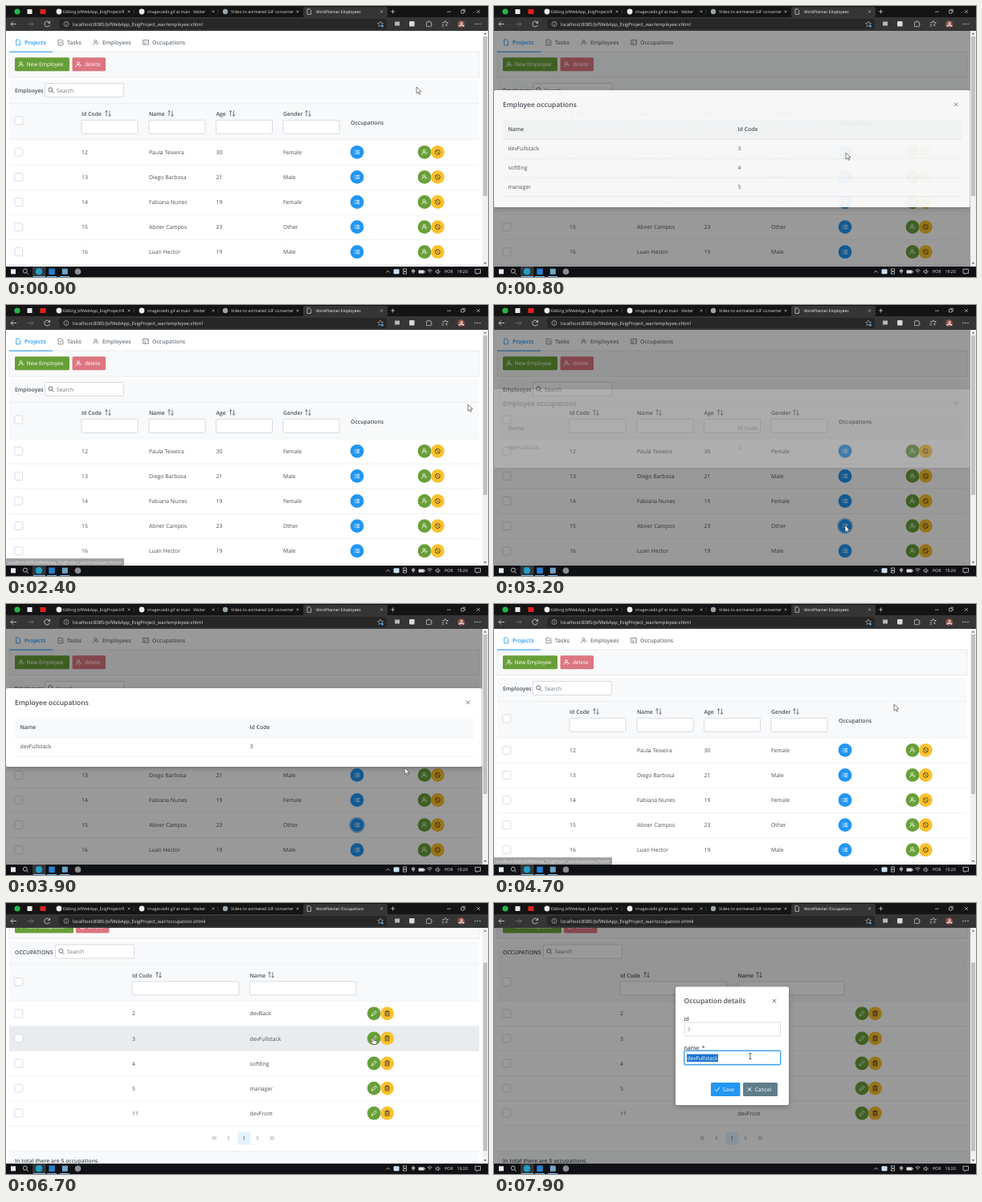
Recreate the animation shown at these times as an HTML page. Size 600 by 338 pixels, loop 8 s.

```html
<!DOCTYPE html>
<html lang="en">
<head>
<meta charset="utf-8">
<title>Employee occupations</title>
<style>
html, body { margin: 0; width: 100%; height: 100%; overflow: hidden; background: #fff; }
svg { display: block; width: 100vw; height: 100vh; }
text { font-family: "Open Sans", "Noto Sans", sans-serif; text-rendering: geometricPrecision; white-space: pre; }
</style>
</head>
<body>
<svg id="stage" viewBox="0 0 600 338"></svg>
<script>
const INK = '#495057', MUTED = '#6c757d', LINE = '#e9ecef', EDGE = '#ced4da', PANEL = '#f8f9fa';
const BLUE = '#2196f3', GREEN = '#689f38', AMBER = '#fbc02d';
const HOST = 'localhost:8085/JsfWebApp_EsigProject_war/';

const rect = (x, y, w, h, fill, more = '') =>
  `<rect x="${x}" y="${y}" width="${w}" height="${h}" fill="${fill}" ${more}/>`;
const disc = (x, y, r, fill, more = '') => `<circle cx="${x}" cy="${y}" r="${r}" fill="${fill}" ${more}/>`;
const ring = (x, y, r, color, w = .8) => disc(x, y, r, 'none', `stroke="${color}" stroke-width="${w}"`);
const line = (d, color, w = .8, more = '') =>
  `<path d="${d}" fill="none" stroke="${color}" stroke-width="${w}" ${more}/>`;
const text = (x, y, s, fill = INK, size = 6.85, more = '') =>
  `<text x="${x}" y="${y}" font-size="${size}" fill="${fill}" ${more}>${s}</text>`;
const bold = (x, y, s, fill = INK, size = 6.85) => text(x, y, s, fill, size, 'font-weight="600"');
const group = (id, body) => `<g id="${id}">${body}</g>`;

const field = (x, y, w, h = 17) => rect(x, y, w, h, '#fff', `rx="1.5" stroke="${EDGE}" stroke-width=".8"`);
const check = y => field(10.8, y - 5, 10, 10);
const cross = (x, y, r, color, w = .9) =>
  line(`M${x - r} ${y - r}l${2 * r} ${2 * r}m0-${2 * r}l-${2 * r} ${2 * r}`, color, w);
const lens = (x, y, color) => ring(x - .7, y - .7, 2.5, color) + line(`M${x + 1.2} ${y + 1.2}l2.2 2.2`, color);
const sort = x => line(`M${x} 137.5v-7l-1.6 2m1.6-2l1.6 2M${x + 4} 130.5v7l-1.6-2m1.6 2l1.6-2`, INK, .7);
const user = (x, y, color) => ring(x - .5, y - 1.6, 1.5, color) +
  line(`M${x - 3.4} ${y + 3}q.3-2.8 2.9-2.8t2.6 1M${x + .8} ${y + 3}l2.8-2.8`, color);
const pencil = (x, y) => line(`M${x - 3} ${y + 3}l.6-2.2 4-4 1.6 1.6-4 4z`, '#fff');
const trash = (x, y, color) =>
  line(`M${x - 3} ${y - 2}h6m-4.2 0v-1.3h2.4v1.3M${x - 2.3} ${y - 2}v5h4.6v-5M${x - .8} ${y - .4}v2m1.6-2v2`, color, .7);
const bars = (x, y) => line([-2, 0, 2].map(d => `M${x - 3.2} ${y + d}h1m1 0h4.4`).join(''), '#fff', .9);
const ban = (x, y) => ring(x, y, 3, '#212529', .7) + line(`M${x - 2} ${y - 2}l4 4`, '#212529', .7);

function button(x, y, w, fill, label, icon, dx = 14.5) {
  return rect(x, y, w, 17, fill, 'rx="1.5"') + icon(x + 8, y + 8.5) + text(x + dx, y + 11, label, '#fff', 6.7);
}

function menu() {
  const items = [[23, 'Projects'], [76, 'Tasks'], [120, 'Employees'], [182, 'Occupations']];
  return items.map(([x, s], i) => {
    const color = i ? MUTED : BLUE, c = x - 8;
    const icon = [
      () => line(`M${c - 2.3} 42h3l1.8 1.8v5h-4.8z`, color),
      () => line(`M${c + 3} 44.5v4.3h-6v-6.6h4.5M${c - 1.5} 45l1.5 1.5 3.5-4`, color),
      () => user(c, 45.5, color),
      () => rect(c - 3.3, 42.5, 6.6, 5.6, 'none', `stroke="${color}" stroke-width=".8"`) + line(`M${c - 2} 45h2m0 2h-2m3-2h1.5`, color)
    ][i]();
    return icon + bold(x, 48, s, color);
  }).join('') + rect(4, 57, 585, 32, PANEL, 'stroke="#dee2e6" stroke-width=".7"') + rect(4, 56.6, 54, 1, BLUE);
}

// Shared table page: caption, filters and five rows
function table(caption, searchX, cols, rows, actions, id) {
  let s = menu() + rect(4, 92.5, 585, 74.3, PANEL) + rect(4, 121, 585, .6, LINE) + bold(11, 108, caption);
  s += field(searchX, 96.5, 98) + lens(searchX + 7.5, 105, INK) + text(searchX + 14.5, 107.6, 'Search', MUTED, 6.7);
  s += check(143);
  for (const [x, label, w, sx] of cols)
    s += w ? bold(x, 137, label) + sort(sx) + field(x, 142.3, w) : bold(x, 147.6, label);
  s += rect(4, 166.8, 585, 31, LINE, `id="${id}Hover"`);
  rows.forEach((cells, i) => {
    const y = 182.3 + 31.1 * i;
    s += rect(4, y - 15.7, 585, .7, LINE) + check(y) + actions(y);
    cells.split('|').forEach((c, k) => s += text(cols[k][0], y + 2.6, c));
  });
  return s + rect(4, 322, 585, .7, LINE);
}

const employees = table('Emplooyes', 48.5,
  [[94, 'Id Code', 70, 125], [178, 'Name', 70, 203], [261.5, 'Age', 70, 279.5], [345, 'Gender', 70, 374], [429, 'Occupations']],
  ['12|Paula Teixeira|30|Female', '13|Diego Barbosa|21|Male', '14|Fabiana Nunes|19|Female', '15|Abner Campos|23|Other', '16|Luan Hector|19|Male'],
  y => disc(437, y, 8.4, BLUE) + bars(437, y) + disc(521, y, 8.4, GREEN) + user(521, y, '#fff') + disc(537.3, y, 8.4, AMBER) + ban(537.3, y), 'emp')
  + button(11, 64.3, 68, GREEN, 'New Employee', (x, y) => user(x, y, '#fff'))
  + button(82.5, 64.3, 41.5, '#dc7680', 'delete', (x, y) => user(x, y, '#fff'), 15.5);

const pager = (x, d, n) => line(Array.from({ length: n }, (_, i) =>
  `M${x + i * 2.6 - n + d} 335.5l${-2 * d} 2.3 ${2 * d} 2.3`).join(''), MUTED, .7);

const occupations = table('OCCUPATIONS', 61.5,
  [[157, 'Id Code', 133, 188], [303.5, 'Name', 132.5, 328]],
  ['2|devBack', '3|devFullstack', '4|softEng', '5|manager', '11|devFront'],
  y => disc(458, y, 8.4, GREEN) + pencil(458, y) + disc(474.5, y, 8.4, AMBER) + trash(474.5, y, '#212529'), 'occ')
  + button(11, 65, 73, GREEN, 'New occupation', (x, y) => line(`M${x - 3} ${y}h6m-3-3v6`, '#fff'), 14)
  + button(87, 65, 41.5, '#dc7680', 'delete', (x, y) => trash(x, y, '#fff'))
  + rect(288.5, 330, 16, 16, '#e3f2fd', 'rx="1.5"') + text(294.6, 340.6, '1')
  + pager(260, 1, 2) + pager(278, 1, 1) + pager(314, -1, 1) + pager(332, -1, 2)
  + rect(4, 354, 585, 16, PANEL) + rect(4, 354, 585, .7, LINE) + bold(11, 368.4, 'In total there are 5 occupations.');

function listDialog(rows) {
  let s = rect(0, 105, 592.5, 50.5 + 24 * rows.length + 23.5, '#fff', 'rx="2" filter="url(#shadow)"')
    + bold(11, 125.6, 'Employee occupations', INK, 8.5) + cross(575, 122.7, 2.3, MUTED)
    + rect(11, 142, 571, 24, PANEL) + bold(17.5, 156.4, 'Name') + bold(303.5, 156.4, 'Id Code');
  rows.forEach(([name, code], i) => {
    const y = 180.2 + 23.8 * i;
    s += rect(11, y - 14.2, 571, .7, LINE) + text(17.5, y, name) + text(303.5, y, code);
  });
  return s + rect(11, 166 + 23.8 * rows.length, 571, .7, LINE);
}

const editDialog = rect(226, 104.5, 141, 147.5, '#fff', 'rx="2" filter="url(#shadow)"')
  + bold(236.5, 124.8, 'Occupation details', INK, 8.5) + cross(349, 122, 2.3, MUTED)
  + bold(236.5, 147, 'id') + field(237, 149, 119.5) + text(240.5, 160, '3', '#868e96')
  + bold(236.5, 183, 'name  *')
  + group('focus', rect(236.6, 184, 120.2, 18, 'none', 'rx="2" stroke="#a6d5fa" stroke-width="2"'))
  + field(237, 184.4, 119.5) + rect(237, 184.4, 119.5, 17, 'none', `id="focusLine" rx="1.5" stroke="${BLUE}" stroke-width=".9"`)
  + rect(240, 188.5, 39, 9.6, '#1b74d1', 'id="pick"') + text(240.5, 195.8, 'devFullstack', INK, 6.7, 'id="value"')
  + button(270, 224, 36.5, BLUE, 'Save', (x, y) => line(`M${x - 3} ${y}l2 2.3 4-5`, '#fff', 1))
  + button(310, 224, 43, '#607d8b', 'Cancel', (x, y) => cross(x, y, 2.3, '#fff', 1));

const closeX = x => cross(x, 7, 1.5, '#ccc', .6);
const chrome = rect(0, 0, 600, 14.5, '#141414') + rect(370, 1, 105, 14, '#353535', 'rx="2"') + rect(0, 14, 600, 17, '#353535')
  + rect(66, 16, 408, 13, '#272727', 'rx="2"')
  + disc(14, 7, 3.6, '#25b648') + rect(26.5, 4, 6, 6, '#e8e8e8') + rect(42.5, 4, 7, 6, '#e32020')
  + disc(66, 7, 3.4, '#f0f0f0') + disc(169, 7, 3.4, '#f0f0f0') + disc(273, 7, 3.2, '#9aa5ad')
  + line('M375 3.8h3l1.6 1.6v5h-4.6z', '#ddd', .7)
  + text(71, 9, 'Editing JsfWebApp_EsigProject/R', '#ddd', 5.1) + text(176, 9, 'images/edit.gif at main · Walter', '#ddd', 5)
  + text(280, 9, 'Video to animated GIF converter', '#ddd', 5.2) + text(386, 9, '', '#fff', 4.9, 'id="tab"')
  + [153, 258, 363, 467.5].map(closeX).join('') + line('M159.5 4v6M264 4v6', '#555', .6)
  + line('M479 7h5m-2.5-2.5v5', '#ddd', .7) + line('M549 7.2h5M566.5 5.5h3.5v3.5h-3.5zM568 5.5v-1.3h3.4v3.4h-1.4', '#ddd', .6)
  + cross(588, 7, 2, '#ddd', .6)
  + line('M13 22.5h-7l3-3m-3 3l3 3', '#ddd') + line('M27 22.5h7l-3-3m3 3l-3 3', '#777')
  + line('M54.4 21.2a3.4 3.4 0 1 0 0 2.6M54.6 18.8v2.5h-2.5', '#ddd')
  + ring(75, 22.5, 3, '#ccc', .6) + line('M75 22v2.3m0-3.8v.7', '#ccc', .6)
  + text(83, 24.7, '', '#ddd', 5.85, 'id="url"')
  + line('M466 19l1 2.3 2.5.2-1.9 1.7.6 2.5-2.2-1.4-2.2 1.4.6-2.5-1.9-1.7 2.5-.2z', '#bbb', .6)
  + rect(484, 19.5, 6, 5, '#b4b7ba') + disc(468.5, 25, 1.5, '#3d9bea') + rect(502, 19, 6.5, 6.5, '#dadada', 'rx="1"')
  + line('M523.5 20h2v-1h1.6v1h2v2h1v1.6h-1v2h-5.6z', '#ccc', .7)
  + line('M543 20.5h3l1-2 1 2h2.4l-2 2 .6 2.5-2-1.3M542.5 23h3m-3 2.2h2.5', '#ccc', .7)
  + disc(566.5, 22.5, 4.5, '#8d4a45') + disc(567, 21.5, 2, '#c9a595') + line('M563.4 25.3q3.5-2.6 7 0', '#e1dcd8', 1.5)
  + [584, 587, 590].map(x => disc(x, 22.5, .7, '#ddd')).join('');

const taskbar = rect(0, 325, 600, 13, '#101114') + rect(33, 325, 16.5, 13, '#34373b')
  + rect(6, 328.3, 6, 6, '#e8eef2') + lens(24.5, 331.3, '#ddd')
  + disc(41, 331.2, 4.1, '#239ec4') + rect(53.3, 327.5, 7.5, 7.5, '#2580d0') + rect(69.8, 327.7, 7, 7, '#6fa6c8')
  + disc(89.5, 331.3, 3.8, '#8b8d90') + rect(34, 337, 15, 1, '#76b9ed') + rect(51, 337, 12, 1, '#76b9ed') + rect(67, 337, 12, 1, '#76b9ed')
  + line('M473 332.5l2.3-2.3 2.3 2.3', '#ddd') + rect(482.5, 328.3, 7, 6, '#c8e1f2', 'rx="1"')
  + rect(494.5, 328, 4, 6, 'none', 'stroke="#ddd" stroke-width=".7"') + disc(496.5, 331, 1, '#ddd')
  + line('M507 328v6m-1.6-4.5h3.2v2h-3.2z', '#ddd', .8) + rect(513.5, 329.5, 7, 4, '#ddd') + rect(521, 330.6, .8, 1.8, '#ddd')
  + line('M524.5 330q3-2.6 6 0m-4.7 1.6q1.7-1.4 3.4 0m-1.7 2v.6', '#ddd')
  + line('M535 330.2h1.4l1.8-1.6v5.4l-1.8-1.6h-1.4zm4.5-.2q1.2 1.3 0 2.8', '#ddd', .7)
  + text(546, 333.2, 'POR', '#eee', 5.2) + text(561.5, 333.2, '19:20', '#eee', 5.2)
  + line('M584 328.3h6.5v5h-3l-1.4 1.4v-1.4h-2.1z', '#eee', .7);

const stage = document.getElementById('stage');
stage.innerHTML = '<filter id="shadow" x="-10%" y="-10%" width="120%" height="130%"><feDropShadow dx="0" dy="2" stdDeviation="3" flood-opacity=".25"/></filter>'
  + rect(0, 0, 600, 338, '#fff')
  + group('emp', employees + disc(437, 275.6, 9, 'none', `id="ring" stroke="#7fc0f5" stroke-width="1.6"`)) + group('occ', occupations)
  + rect(0, 31, 593, 294, '#000', 'id="mask"')
  + group('listA', listDialog([['devFullstack', 3], ['softEng', 4], ['manager', 5]]))
  + group('listB', listDialog([['devFullstack', 3]])) + group('edit', editDialog)
  + rect(593, 31, 7, 294, '#f1f1f1') + rect(594, 38, 5, 199, '#c1c1c1', 'id="thumb"')
  + '<path d="M594.8 35.5l1.7-2 1.7 2zM594.8 320l1.7 2 1.7-2z" fill="#555"/>'
  + group('status', rect(0, 316, 147, 9, '#444', 'rx="1"') + text(2, 322.6, '', '#ddd', 5, 'id="link"'))
  + chrome + taskbar
  + `<g id="cursor" stroke="#333" stroke-width=".6" fill="#fff">
    <path id="arrow" d="M0 0v8.2l2-1.8 1.3 2.9 1.3-.6-1.3-2.8h2.6z"/>
    <path id="hand" d="M-.8 1q0-1 .8-1t.8 1v3.2l3.2.7q1 .3.9 1.4l-.6 3h-4.6l-2.6-3q-.3-1.2.9-.9l1.2.9z"/>
    <path id="beam" d="M-1.5-3.5h3m-1.5 0v7m-1.5 0h3" stroke-width=".8"/></g>`;

const el = Object.fromEntries([...stage.querySelectorAll('[id]')].map(e => [e.id, e]));
const clamp = v => Math.max(0, Math.min(1, v));
const swing = v => .5 - Math.cos(Math.PI * clamp(v)) / 2;
const show = (e, v) => { e.style.opacity = +v; };

// Pointer path: time, x, y
const path = [[0, 511, 101], [420, 438, 183], [1200, 438, 183], [1800, 539, 139], [2050, 574, 121], [2250, 574, 121],
  [2400, 575, 124], [2520, 572, 132], [2980, 437, 275], [3500, 437, 275], [4350, 567, 120], [4550, 567, 120], [4700, 498, 125],
  [5080, 204, 45], [5480, 204, 45], [6000, 469, 166], [6350, 469, 166], [6650, 457, 167], [7250, 457, 167], [7580, 319, 191], [8000, 319, 191]];

function pointer(t) {
  const i = path.findIndex((k, n) => n && t <= k[0]);
  const [a, b] = [path[i - 1], path[i]], p = swing((t - a[0]) / (b[0] - a[0]));
  return [a[1] + (b[1] - a[1]) * p, a[2] + (b[2] - a[2]) * p];
}

const dialogs = [['listA', 470, 2250], ['listB', 3080, 4550], ['edit', 6900, 9000]];
const links = [[2000, 2320, 'employee.xhtml#'], [4330, 4620, 'employee.xhtml#'], [5040, 5450, 'occupation.xhtml']];

function draw(t) {
  const second = t >= 5450, [x, y] = pointer(t);
  const scroll = 44.5 * (1 - (1 - clamp((t - 6000) / 281)) ** 2);
  show(el.emp, !second);
  show(el.occ, second);
  el.occ.setAttribute('transform', `translate(0 ${-scroll})`);
  el.thumb.setAttribute('y', second ? 37 + scroll * .84 : 38);
  el.thumb.setAttribute('height', second ? 235 : 199);
  el.tab.textContent = 'WorkPlanner ' + (second ? 'Occupations' : 'Employees');
  el.url.textContent = HOST + (second ? 'occupation.xhtml' : 'employee.xhtml');

  let veil = 0;
  for (const [id, from, to] of dialogs) {
    const out = 1 - clamp((t - to) / 100);
    show(el[id], Math.min(swing((t - from) / 400), out));
    veil = Math.max(veil, Math.min(clamp((t - from) / 120), out));
  }
  show(el.mask, veil * .4);
  show(el.ring, t > 3050 && t < 4600);

  const row = Math.floor((y + scroll - 166.8) / 31.1), over = !veil && row >= 0 && row < 5;
  for (const id of ['empHover', 'occHover']) {
    show(el[id], over);
    el[id].setAttribute('y', 166.8 + 31.1 * row);
  }

  show(el.status, 0);
  for (const [from, to, page] of links) {
    if (t < from || t > to + 160) continue;
    show(el.status, Math.min(clamp((t - from) / 80), 1 - clamp((t - to) / 160)));
    el.link.textContent = HOST + page;
  }

  const typed = t >= 7400, picked = t >= 7700;
  show(el.focus, typed);
  show(el.focusLine, typed);
  show(el.pick, picked);
  el.value.setAttribute('fill', picked ? '#fff' : INK);

  const onButton = over && (second ? x > 449 && x < 483 : (x > 428 && x < 446) || (x > 512 && x < 546));
  const onLink = links.some(([from, to]) => t >= from && t < to);
  const beam = t > 7480, hand = !beam && (onButton || onLink);
  show(el.beam, beam);
  show(el.hand, hand);
  show(el.arrow, !beam && !hand);
  el.cursor.setAttribute('transform', `translate(${x} ${y})`);
}

const start = performance.now();
function tick() {
  draw((performance.now() - start) % 8000);
  requestAnimationFrame(tick);
}
tick();
</script>
</body>
</html>
```
